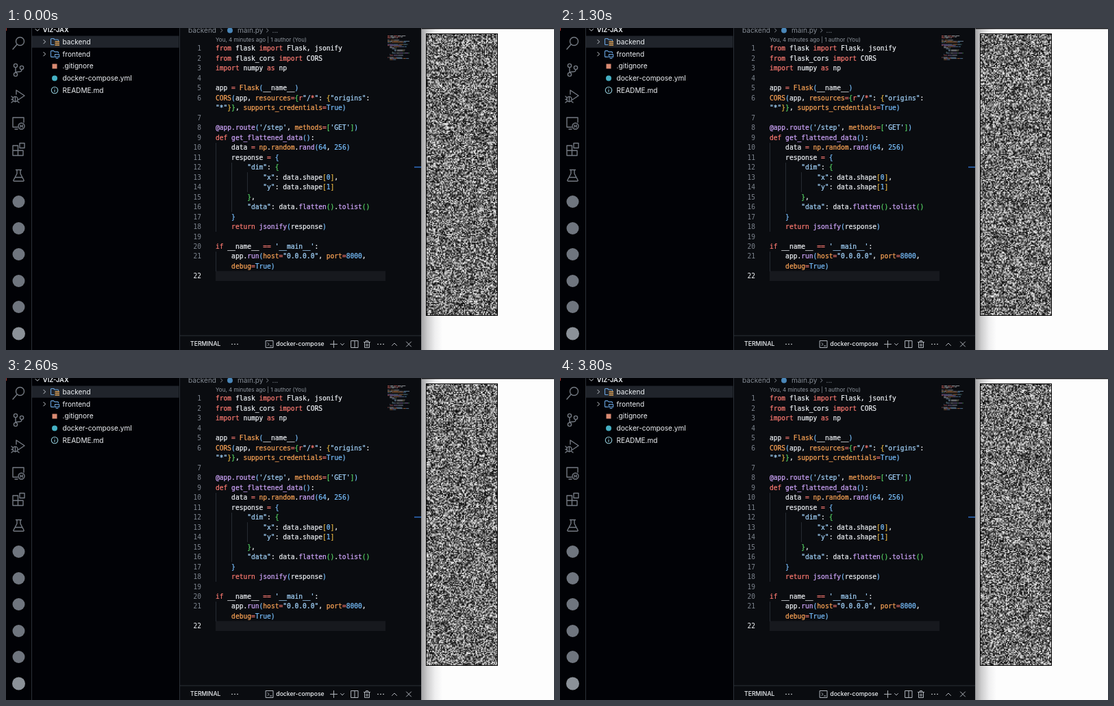
These frames come from a looping animation (800x471 px, 3900 ms). An HTML page with a canvas:

```html
<!DOCTYPE html>
<html lang="en">
<head>
<meta charset="utf-8">
<title>Editor and noise grid</title>
<style>
html, body { margin: 0; width: 100%; height: 100%; overflow: hidden; background: #0a0c10; }
svg, canvas { position: absolute; display: block; }
svg { left: 0; top: 0; }
canvas { left: 614px; top: 9px; }
text { white-space: pre; font-family: Inter, sans-serif; }
.code text { font: 9.6px "DejaVu Sans Mono", monospace; stroke-width: .22px; }
.line { fill: none; stroke-linecap: round; stroke-linejoin: round; }
</style>
</head>
<body>
<svg width="800" height="471" viewBox="0 0 800 471">
  <defs>
    <linearGradient id="shade">
      <stop offset="0" stop-color="#a4a4a6"/>
      <stop offset=".3" stop-color="#cfcfd0"/>
      <stop offset=".65" stop-color="#efeff0"/>
      <stop offset="1" stop-color="#fdfdfd"/>
    </linearGradient>
  </defs>

  <!-- panes -->
  <rect width="253" height="471" fill="#010206"/>
  <rect x="253" width="354" height="471" fill="#0a0c10"/>
  <rect x="606.500" width="193.500" height="471" fill="#fdfdfd"/>
  <rect x="606.500" width="30.500" height="471" fill="url(#shade)"/>
  <rect x="606.500" width="193.500" height="1.500" fill="#16171a"/>
  <path d="M37.500 0V471M253.500 0V471M254 450H606" stroke="#2b3037" fill="none"/>
  <rect width="1" height="4" fill="#a33a34"/>

  <!-- activity bar -->
  <g class="line" stroke="#757b84" stroke-width="1.400">
    <circle cx="20.500" cy="19.500" r="6"/><path d="M16 24L10 31"/>
    <circle cx="14" cy="55" r="2.600"/><circle cx="14" cy="68" r="2.600"/><circle cx="23" cy="58" r="2.600"/>
    <path d="M14 58V65M23 61Q23 64 19 64Q14 64 14 65"/>
    <path d="M15 97V91L27 99L18 105"/><circle cx="13.500" cy="104" r="3.600"/>
    <path d="M13.500 100.500V108M8 100L10.500 102M8 104.500H10M8 109L10.500 107M19 109L16.500 107"/>
    <path d="M17 145H10V131H26V138M13 148H17"/><circle cx="22.500" cy="143.500" r="4.500"/>
    <path d="M20.500 142L22 143.500L20.500 145M24.500 142L23.300 143.500L24.500 145"/>
    <path d="M10 172H17.500V186.500H10ZM10 179.300H25V186.500H17.500M20 168.500H27V175.500H20Z"/>
    <path d="M14.500 207.500H22.500M16 207.500V213L11 222.500Q10.500 224 12 224H25Q26.500 224 26 222.500L21 213V207.500M13.500 218.500H23.500"/>
  </g>
  <g fill="#6f757e" id="marks"></g>
  <circle cx="18.500" cy="447" r="9.500" fill="#8b9198"/>

  <!-- explorer -->
  <rect x="38" y="11.500" width="214.500" height="17.300" fill="#20242b"/>
  <g class="line" stroke="#c5cad0" stroke-width="1">
    <path d="M43 1.500L45.800 4.300L48.600 1.500M54.800 17.300L57.600 20.100L54.800 22.900M54.800 35.300L57.600 38.100L54.800 40.900"/>
  </g>
  <g class="line" stroke="#6ba5e0" stroke-width="1.100">
    <path id="folder" d="M70 24.500H66.500Q65.500 24.500 65.500 23.500V16.500Q65.500 15.500 66.500 15.500H69.500L71 17H75.500Q76.500 17 76.500 18.500"/>
    <use href="#folder" y="17.900"/>
    <path d="M71.500 38.500H77.500V42.500H71.500ZM73 44.500H76"/>
  </g>
  <g class="line" stroke="#8fc7d6" stroke-width="1.100">
    <circle cx="71" cy="91" r="4.700"/><path d="M71 90.500V93.300M71 88.500V88.600"/>
  </g>
  <path d="M71.500 20H78M71.500 22.500H78M71.500 25H78" stroke="#d9a15a" stroke-width="1.500"/>
  <rect x="67.500" y="52.500" width="7" height="7" fill="#d98a72"/>
  <circle cx="71" cy="73.500" r="4" fill="#45b0c4"/>
  <text x="53.800" y="6" font-size="9.200" font-weight="700" fill="#e2e6ea">VIZ-JAX</text>
  <g id="files" font-size="10.100" fill="#f0f3f6"></g>

  <!-- breadcrumb and code -->
  <g font-size="10.100" fill="#858c95">
    <text x="266" y="6.500">backend</text><text x="338" y="6.500">main.py</text><text x="388.500" y="6.500">...</text>
    <path class="line" stroke="#858c95" d="M313.500 1L316 3.500L313.500 6M380.500 1L383 3.500L380.500 6"/>
    <circle cx="327" cy="3.500" r="4" fill="#4a86b8"/>
  </g>
  <text x="306" y="20" font-size="8.050" fill="#8f969f">You, 4 minutes ago | 1 author (You)</text>
  <rect x="306" y="355.500" width="248" height="14.500" fill="#17191e"/>
  <path d="M306.500 168V298M306.500 327V356M329.500 197V269M352.500 211V240" stroke="#262b32"/>
  <g class="code" id="code"></g>
  <g id="map" opacity=".6"></g>
  <path d="M596 203.500H606" stroke="#2f6fc4" stroke-width="1.500"/>

  <!-- terminal bar -->
  <g fill="#eef1f4">
    <text x="269" y="465.300" font-size="8.700" font-weight="500">TERMINAL</text>
    <text x="394.300" y="465.300" font-size="8.650" font-weight="500">docker-compose</text>
    <g id="dots"></g>
  </g>
  <g class="line" stroke="#b0b5bc" stroke-width="1">
    <path d="M379.500 457.500H390V467.500H379.500ZM382 460.500L384 462.500L382 464.500M385.500 465H388"/>
    <path d="M473.500 462.500H483.500M478.500 457.500V467.500M488.500 461.500L491 464L493.500 461.500"/>
    <path d="M504 457.500H514V467.500H504ZM509 457.500V467.500"/>
    <path d="M522.500 459.500H531.500M525.500 459V457.500H528.500V459M523.500 460V467.500H530.500V460M526 462V465.500M528 462V465.500"/>
    <path d="M563.500 464.500L567 461L570.500 464.500M584.500 459L591.500 466M591.500 459L584.500 466"/>
  </g>

  <rect x="613.500" y="8.500" width="104" height="412" fill="#555" stroke="#000"/>
</svg>
<canvas id="noise" width="103" height="411"></canvas>

<script>
const NS = 'http://www.w3.org/2000/svg';
const $ = id => document.getElementById(id);
function add(parent, tag, attrs, text) {
  const el = document.createElementNS(NS, tag);
  for (const k in attrs) el.setAttribute(k, attrs[k]);
  if (text !== undefined) el.textContent = text;
  parent.appendChild(el);
  return el;
}

[254, 293, 331, 370, 408].forEach(y => add($('marks'), 'circle', { cx: 18.5, cy: y, r: 9 }));
['backend', 'frontend', '.gitignore', 'docker-compose.yml', 'README.md'].forEach((name, i) =>
  add($('files'), 'text', { x: 82.6, y: 23.8 + i * 17.7 }, name));
for (const x of [334, 547])
  for (const d of [-4, 0, 4]) add($('dots'), 'circle', { cx: x + d, cy: 462.5, r: 0.8 });

// Each piece after "~" starts with its colour key; ">" marks a wrapped row.
const COLORS = {
  w: '#eef1f5', k: '#ff7b72', s: '#a5d6ff', f: '#d2a8ff', c: '#79c0ff',
  o: '#ffa657', g: '#56d364', y: '#e3b341'
};
const SOURCE = `~kfrom~w flask ~kimport~w Flask, jsonify
~kfrom~w flask_cors ~kimport~w CORS
~kimport~w numpy ~kas~w np

~wapp ~k= ~oFlask~c(~w__name__~c)
~oCORS~c(~wapp, ~oresources~k=~g{~kr~s"/~k*~s"~w: ~y{~s"origins"~w:
>~s"*"~y}~g}~w, ~osupports_credentials~k=~cTrue)

~f@app.route~c(~s'/step'~w, ~omethods~k=~g[~s'GET'~g]~c)
~kdef ~fget_flattened_data~c()~w:
~w    data ~k= ~onp~w.~orandom~w.~frand~c(64~w, ~c256)
~w    response ~k= ~c{
~s        "dim"~w: ~g{
~s            "x"~w: data.shape~y[~c0~y]~w,
~s            "y"~w: data.shape~y[~c1~y]
~g        }~w,
~s        "data"~w: data.~fflatten~g()~w.~ftolist~g()
~c    }
~k    return ~fjsonify~c(~wresponse~c)

~kif ~w__name__ ~k== ~s'__main__'~w:
~w    app.~frun~c(~ohost~k=~s"0.0.0.0"~w, ~oport~k=~c8000~w,
>~o    debug~k=~cTrue)
`;

let num = 0;
SOURCE.split('\n').forEach((row, i) => {
  const y = 33.4 + i * 14.48;
  if (row[0] !== '>') {
    num++;
    const now = num === 22;
    add($('code'), 'text', {
      x: 285, y, 'text-anchor': 'end',
      fill: now ? '#f0f3f6' : '#7d848e', 'font-weight': now ? 700 : 400
    }, num);
  }
  const line = add($('code'), 'text', { x: 306, y });
  let col = 0;
  row.split('~').slice(1).forEach(part => {
    const fill = COLORS[part[0]], text = part.slice(1);
    add(line, 'tspan', { fill, stroke: fill }, text);
    for (const word of text.matchAll(/\S+/g))
      add($('map'), 'rect', {
        x: 557 + (col + word.index) * 0.82, y: 11 + i * 1.58,
        width: word[0].length * 0.82, height: 0.9, fill
      });
    col += text.length;
  });
});

const COLS = 64, ROWS = 256, STEP = 100, STEPS = 39, ZOOM = 6;
function makeCanvas(w, h) {
  const c = document.createElement('canvas');
  c.width = w;
  c.height = h;
  return c;
}
const grid = makeCanvas(COLS, ROWS), big = makeCanvas(COLS * ZOOM, ROWS * ZOOM);
const gridCtx = grid.getContext('2d'), bigCtx = big.getContext('2d');
const view = $('noise').getContext('2d');
const cells = gridCtx.createImageData(COLS, ROWS);
bigCtx.imageSmoothingEnabled = false;
view.imageSmoothingQuality = 'high';

function random(seed) {
  return () => {
    seed = seed + 0x6D2B79F5 | 0;
    let t = Math.imul(seed ^ seed >>> 15, 1 | seed);
    t = t + Math.imul(t ^ t >>> 7, 61 | t) ^ t;
    return ((t ^ t >>> 14) >>> 0) / 4294967296;
  };
}

function drawNoise(step) {
  const rand = random(step * 7919 + 17);
  for (let i = 0; i < cells.data.length; i += 4) {
    cells.data.fill(10 + 235 * rand() ** 1.3, i, i + 3);
    cells.data[i + 3] = 255;
  }
  gridCtx.putImageData(cells, 0, 0);
  bigCtx.drawImage(grid, 0, 0, big.width, big.height);
  view.drawImage(big, 0, 0, 103, 411);
}

let shown = -1;
function render(time) {
  const step = Math.floor(time / STEP) % STEPS;
  if (step !== shown) drawNoise(shown = step);
  requestAnimationFrame(render);
}
render(0);
</script>
</body>
</html>
```
